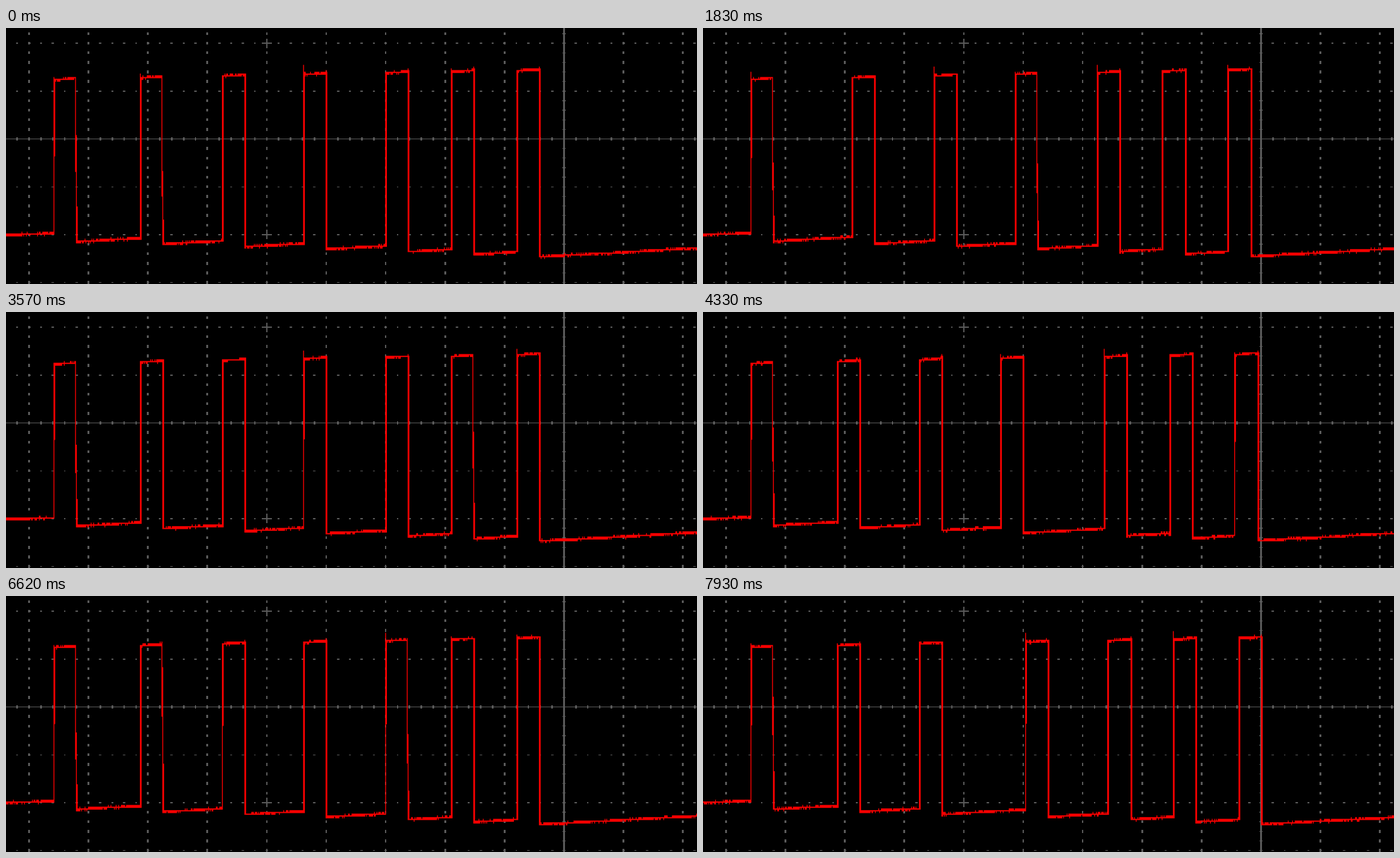
Recreate the animation shown at these times as a matplotlib script. Size 1094 px wide and 405 px high, loop 8 s.

```python
import numpy as np
import matplotlib.pyplot as plt
from matplotlib.animation import FuncAnimation
from matplotlib.collections import PolyCollection
from matplotlib.patches import Polygon

W, H, DPI = 1094, 405, 64
COLS = 800
CELL = W / COLS           # width of one trace column
STEP = 2.75               # height of one sampling level
LOOP, TICK, SLOT = 8000, 20, 108.2

GRID = "#5a5a5a"
X0, DX = 36.5, 94.1       # grid divisions
Y0, DY = 175.5, 75.7
AXIS_X = X0 + 9 * DX
CROSS_X = X0 + 4 * DX

PULSES, FIRST, WIDTH = 7, 77.4, 35.9

# Slots without a new sweep: often in the middle of the loop, seldom outside
HELD = {int(2 + 9.58 * j) for j in (0, 1, 6, 7)}
HELD |= {int(15.5 + 3.19 * j) for j in range(12)}


def box(cx, cy, w, h):
    l, r, t, b = cx - w / 2, cx + w / 2, cy - h / 2, cy + h / 2
    return [(l, t), (r, t), (r, b), (l, b)]


def grid_boxes():
    parts = [box(W / 2, Y0, W, 1.4), box(AXIS_X, H / 2, 2.6, H)]
    minor_x = X0 + np.arange(-1, 58) * DX / 5
    minor_y = Y0 + np.arange(-11, 16) * DY / 5
    for i in range(12):
        x = X0 + i * DX
        if i != 9:
            parts += [box(x, y, 2.7, 4.4) for y in minor_y]
    for j in (-2, -1, 1, 2, 3):
        y = Y0 + j * DY
        parts += [box(x, y, 4 if n % 2 else 2.7, 1.4)
                  for n, x in enumerate(minor_x)]
    parts += [box(x, Y0, 2.7, 5.4) for x in minor_x]
    parts += [box(AXIS_X, y, 5.6, 1.4) for y in minor_y]
    for y in (Y0 - 2 * DY, Y0 + 2 * DY):
        parts += [box(CROSS_X, y, 16, 1.4), box(CROSS_X, y, 2.6, 15)]
    return parts


def swing(k, start, period, amp):
    """One full stick movement: to one side, to the other and back."""
    phase = np.clip((k - start) / period, 0, 1)
    return amp * np.sin(2 * np.pi * phase)


def pulse_starts(k):
    gaps = [136.8 + swing(k, 1, 26.3, -36),
            130,
            128.2 + swing(k, 62, 14.7, -40),
            130 + swing(k, 35.1, 14.4, 40),
            103.8, 103.8]
    return FIRST + np.concatenate([[0], np.cumsum(gaps)])


def to_column(x):
    return np.round(x / CELL - 1.5).astype(int)


def sweep(k):
    """Lowest and highest y in each trace column for sweep k."""
    rng = np.random.default_rng(k + 11)
    starts = pulse_starts(k)
    rise, fall = to_column(starts), to_column(starts + WIDTH)

    x = np.arange(COLS) * CELL
    y = 327.5 - 0.035 * x
    for i, (r, f) in enumerate(zip(rise, fall)):
        top, base = 82 - 3.1 * i + 0.12 * i * i, 338 + 4 * i
        y[r:f] = top - 0.07 * (x[r:f] - x[r])
        y[f:] = base - 0.055 * (x[f:] - x[f])
    y += rng.normal(0, 0.4)

    samples = y + rng.normal(0, 0.8, (6, COLS))
    levels = 337 + STEP * np.round((samples - 337) / STEP)
    lo, hi = levels.min(axis=0), levels.max(axis=0)

    for i, (r, f) in enumerate(zip(rise, fall)):
        soft_rise, soft_fall = (rng.random(2) < 0.15) | (i == 0)

        top, base = lo[r + 2], hi[r - 1]
        lo[r:r + 2], hi[r:r + 2] = top, base
        lo[r] -= STEP * min(rng.geometric(0.4) - 1, 4)
        if soft_rise:
            hi[r + 1] = rng.uniform(200, 206)

        top, base = lo[f - 1], hi[f + 3]
        lo[f:f + 2], hi[f:f + 2] = top, base
        if soft_fall:
            a = rng.uniform(110, 235)
            third = (base - a) / 3
            lo[f - 1:f + 2] = top, a, a + 2 * third
            hi[f - 1:f + 2] = a + third, base, base
        else:
            lo[f] -= STEP * rng.integers(0, 2)
    return lo, hi


edges = np.repeat(np.arange(COLS + 1), 2)[1:-1] * CELL


def outline(k):
    lo, hi = sweep(k)
    upper = np.column_stack([edges, np.repeat(lo - 0.95, 2)])
    lower = np.column_stack([edges, np.repeat(hi + 0.95, 2)])
    return np.concatenate([upper, lower[::-1]])


fig = plt.figure(figsize=(W / DPI, H / DPI), dpi=DPI, facecolor="black")
ax = fig.add_axes([0, 0, 1, 1])
ax.set_xlim(0, W)
ax.set_ylim(H, 0)
ax.axis("off")
ax.add_collection(PolyCollection(grid_boxes(), facecolor=GRID, linewidth=0))
trace = ax.add_patch(Polygon(outline(0), closed=True, facecolor="#ff0000",
                             linewidth=0, zorder=3))


def draw(n):
    k = int((n * TICK + 25) / SLOT)
    if k in HELD:
        k -= 1
    trace.set_xy(outline(k))
    return (trace,)


anim = FuncAnimation(fig, draw, frames=LOOP // TICK, interval=TICK,
                     repeat=True, repeat_delay=0, blit=False)
plt.show()
```
